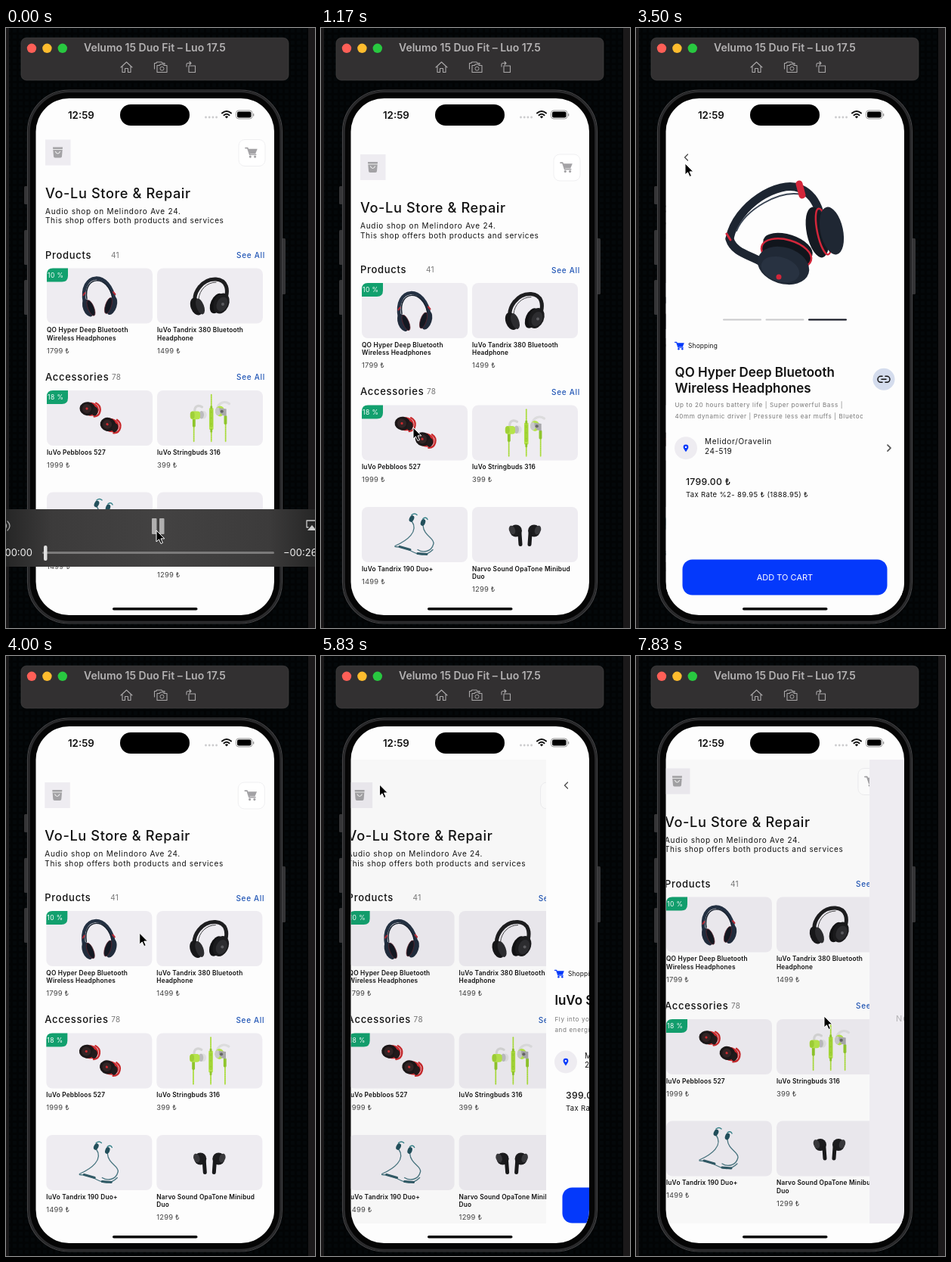
These frames come from a looping animation (409 by 793 pixels, 8 s). An HTML page:

```html
<!DOCTYPE html>
<html lang="en">
<head>
<meta charset="utf-8">
<title>Audio shop app</title>
<style>
  html, body { margin: 0; width: 100%; height: 100%; overflow: hidden; background: #000; }
  svg { display: block; width: 409px; height: 793px; font-family: Inter, "Noto Sans", sans-serif; }
  text { white-space: pre; }
</style>
</head>
<body>
<svg id="stage" viewBox="0 0 409 793"></svg>
<script>
const LOOP = 8000, FPS = 6, SLIDE = 315;
const CARD = '#eeecf1', PAPER = '#fdfdfd', BLUE = '#0439fb';

// Markup helpers
const text = (x, y, size, str, { w = 400, ls = 0, fill = '#111', anchor = 'start' } = {}) =>
  `<text x="${x}" y="${y}" font-size="${size}" font-weight="${w}" letter-spacing="${ls}" fill="${fill}" text-anchor="${anchor}">${str.replace(/&/g, '&amp;')}</text>`;
const rect = (x, y, w, h, r, fill, extra = '') =>
  `<rect x="${x}" y="${y}" width="${w}" height="${h}" rx="${r}" fill="${fill}" ${extra}/>`;
const disc = (x, y, r, fill) => `<circle cx="${x}" cy="${y}" r="${r}" fill="${fill}"/>`;
const oval = (x, y, rx, ry, turn, fill, extra = '') =>
  `<ellipse rx="${rx}" ry="${ry}" transform="translate(${x} ${y}) rotate(${turn})" fill="${fill}" ${extra}/>`;
const line = (d, color, width = 1, extra = '') =>
  `<path d="${d}" fill="none" stroke="${color}" stroke-width="${width}" stroke-linecap="round" stroke-linejoin="round" ${extra}/>`;
const shape = (d, fill) => `<path d="${d}" fill="${fill}"/>`;
const at = (x, y, body, scale = 1) => `<g transform="translate(${x} ${y}) scale(${scale})">${body}</g>`;
const group = (id, body, extra = '') => `<g id="${id}" ${extra}>${body}</g>`;

const cartIcon = (x, y, scale, color) => at(x, y,
  line('M0 1H2.6L5.4 9.3H13', color, 1.6) + shape('M3.4 2.2H15L12.6 8.2H5.4Z', color) +
  disc(6, 12, 1.5, color) + disc(12, 12, 1.5, color), scale);

// Products, each centred on 0,0
const frontHeadphones =
  line('M-20 9C-28-32 14-36 20 8', '#243143', 4.5) + line('M-17 4C-22-27 11-29 17 3', '#16202d', 1.5) +
  line('M-21.5-1L-19.500-4M20.500-2L18-5', '#b92a35', 2) +
  oval(-15.5, 16, 6.5, 12, -22, '#212c3c') + oval(16, 13, 6.5, 12.5, 18, '#212c3c') +
  oval(-11.5, 16, 4, 11, -22, '#131822', 'stroke="#6d2730" stroke-width=".6"') +
  oval(11.5, 13, 4, 11, 18, '#131822', 'stroke="#6d2730" stroke-width=".6"');

const sideHeadphones =
  line('M-34 18C-40-30-22-64 6-64C34-64 44-28 36 22', '#1c2430', 14) +
  line('M-26 8C-26-34-14-57 6-57C24-57 33-34 31-2', '#343e4c', 2) +
  line('M32-13L46-13', '#d3263a', 7, 'stroke-linecap="butt"') +
  oval(19, 36, 20, 30, 24, '#171c25') + oval(24, 33, 12, 20, 24, '#2b313b') +
  oval(3, 43, 10, 26, 14, '#11151c', 'stroke="#c42336" stroke-width="2.5"') +
  oval(-21, 34, 23, 35, -20, '#202936') + oval(-25, 36, 17, 27, -20, '#273140') +
  disc(-35, 44, 2.5, '#d3263a');

const tiltedHeadphones =
  line('M-73 4C-64-40-8-74 20-62C34-56 42-44 46-30', '#1d2531', 11) +
  line('M-73 5C-67 24-45 26-30 36', '#1d2531', 11) +
  line('M-64-6C-52-34-8-60 22-54', '#3a4554', 2) +
  line('M19-68L23-53', '#d3263a', 9, 'stroke-linecap="butt"') + line('M-77-2L-72 6', '#d3263a', 3) +
  oval(43, -4, 14, 34, -12, '#151a22') + oval(51, -5, 8, 31, -12, 'none', 'stroke="#d3263a" stroke-width="2.5"') +
  oval(62, -6, 15, 32, -12, '#1f2733') +
  oval(4, 16, 34, 17, 18, '#171c25') + oval(2, 24, 34, 18, 16, '#11151c', 'stroke="#d3263a" stroke-width="2.5"') +
  oval(-2, 40, 35, 24, 17, '#202936') + oval(-6, 45, 26, 16, 17, '#283241') + disc(-8, 55, 3.5, '#d3263a');

const blackHeadphones =
  line('M-19 12C-24-4-10-23 8-22C22-21 26-8 19 8', '#1e1e20', 5) + line('M-15 4C-14-8-4-18 8-18', '#444446', 1) +
  oval(-18, 14, 7.5, 12, -20, '#171719') + oval(-13, 14, 5, 11, -20, '#2c2c2f') +
  oval(9, 10, 8, 14, 24, '#111113') + oval(15, 10, 10, 14, 24, '#1b1b1d') + oval(16, 11, 7, 10, 24, '#2d2d30') + disc(17, 11, 2, '#5c5c60');

const bud = (x, y, turn) => at(x, y, `<g transform="rotate(${turn})">` +
  line('M8-9C17-6 17 7 8 9', '#c92a2d', 2.4) + oval(2, 0, 11, 9, 0, '#d02b30') +
  oval(-2, 0, 10.5, 9, 0, '#1c1718') + oval(-3, 0, 6, 6, 0, '#332526') + oval(8, 2, 4, 6, 0, '#221b1c') +
  disc(-3, 0, 1.6, '#d02b30') + '</g>');
const redBuds = bud(-14, -12, 8) + bud(13, 9, 15);

const LIME = '#b5e34a', LIME_DARK = '#8fc52c';
const wire = (x, from, to) => line(`M${x} ${from}V${to}`, LIME, 5, 'stroke-linecap="butt"') +
  line(`M${x} ${from}V${to}`, LIME_DARK, 1.5, 'stroke-dasharray="3 5"');
const limeEarphones =
  wire(-61, 28, 88) + wire(5, -88, 88) + wire(59, 10, 88) +
  rect(-3, -38, 16, 82, 3, LIME) + rect(0, -32, 10, 66, 4, '#a4d636', `stroke="${LIME_DARK}"`) +
  [-22, 0, 22].map(y => disc(5, y, 2, LIME_DARK)).join('') +
  rect(1, -46, 8, 12, 2, LIME_DARK) + rect(1, 40, 8, 14, 2, LIME_DARK) +
  line('M-58-28C-58-46-44-50-30-42', '#d4d4d4', 9) +
  oval(-24, -12, 12, 15, 0, '#dededf') + oval(-32, -12, 9, 15, 0, '#bcbcbe') +
  rect(-66, -2, 11, 36, 4, LIME_DARK) + rect(-75, -26, 38, 31, 11, LIME) + oval(-66, -11, 8, 14, 0, '#9fcf38') +
  line('M26-32C32-60 56-66 73-54', '#dcdcdd', 9) +
  rect(53, -10, 11, 34, 4, LIME_DARK) + oval(38, -26, 17, 20, 0, LIME) +
  oval(30, -25, 10, 15, 0, '#c9c9cb') + shape('M36-38L62-34L62-7L48-10C38-18 34-26 36-38Z', '#a9a9ab') + disc(45, -25, 6, '#666');

const neckband =
  line('M-4-18C6-4-10 8-26 15', '#47747f', 1.3) +
  line('M11-12C12 2 26 4 25 12C22 24 10 24 4 20', '#47747f', 1.3) +
  line('M-26 16C-16 16-8 20 0 24S16 28 24 20', '#47747f', 1.3) +
  line('M-20 16L-6 20M4 25L16 26', '#315a66', 3) +
  oval(-4, -21, 3, 4.5, 25, '#23505c') + oval(11, -16, 3, 4.5, 20, '#23505c') +
  line('M-4-26Q0-29 3-26M11-21Q15-24 17-20', '#37838a', 1.5);

const pod = side => oval(side * 12, -5, 8, 8, 0, '#1c1c1e') + oval(side * 17, -6, 4, 6, side * 20, '#39393c') +
  line(`M${side * 7}-1L${side * 6} 13`, '#19191b', 5);
const blackPods = pod(-1) + pod(1);

// Shop page
const card = (x, y, art, scale, names, price, badge) =>
  rect(x, y, 140, 73, 8, CARD) + at(x + 70, y + 36.5, art, scale) +
  (badge ? shape(`M${x} ${y + 8}q0-8 8-8h20v10q0 8-8 8h-20z`, '#12a06e') +
    text(x + 1, y + 12, 8.5, badge, { ls: .45, fill: '#fff' }) : '') +
  names.map((n, i) => text(x, y + 84.5 + i * 10.5, 8.3, n, { w: 600, ls: .2 })).join('') +
  text(x, y + 101.5 + (names.length - 1) * 10.5, 9.4, price, { ls: .2, fill: '#444' });

const section = (y, title, count, countX) =>
  text(52, y, 13, title, { w: 500, ls: .7 }) + text(countX, y - 1, 10, count, { ls: .3, fill: '#777' }) +
  text(343, y - .5, 10, 'See All', { w: 500, ls: .7, fill: '#2055b5', anchor: 'end' });

const shopPage = group('scroll',
  rect(52, 167, 33.5, 34, 0, CARD) +
  shape('M62 177H75L74 189Q74 191 72 191H65Q63 191 63 189Z', '#a3a2a5') + line('M62.5 180H74.5M65.5 183Q68.5 188 71.5 183', '#eee', 1.2) +
  group('cartButton', rect(308, 167, 35, 35, 8, '#fff', 'stroke="#efeff1"') + cartIcon(317, 177, 1.05, '#a3a2a5')) +
  text(52, 244, 18.2, 'Vo-Lu Store & Repair', { w: 500, ls: .6 }) +
  text(52, 265, 10, 'Audio shop on Melindoro Ave 24.', { ls: .75 }) +
  text(52, 277.7, 10, 'This shop offers both products and services', { ls: .65 }) +
  section(324, 'Products', '41', 139) +
  card(54, 337, frontHeadphones, 1, ['QO Hyper Deep Bluetooth', 'Wireless Headphones'], '1799 ₺', '10 %') +
  card(200, 337, blackHeadphones, 1, ['luVo Tandrix 380 Bluetooth', 'Headphone'], '1499 ₺') +
  section(485, 'Accessories', '78', 140) +
  card(54, 498.5, redBuds, 1, ['luVo Pebbloos 527'], '1999 ₺', '18 %') +
  card(200, 498.5, limeEarphones, .35, ['luVo Stringbuds 316'], '399 ₺') +
  card(54, 633, neckband, 1, ['luVo Tandrix 190 Duo+'], '1499 ₺') +
  card(200, 633, blackPods, 1, ['Narvo Sound OpaTone Minibud', 'Duo'], '1299 ₺'));

// Product page
const productPage = ({ id, slides, names, about, price, tax }) => {
  const drop = (names.length - 1) * 18.7, mid = 455 + drop / 2, linkX = 328;
  return group(id,
    rect(40, 137, 315, 613, 0, PAPER) + line('M68.5 167L64.5 171L68.5 175', '#444', 1.2) +
    '<g clip-path="url(#contentClip)">' +
    group(id + 'Slides', slides.map((art, i) => at(197 + i * SLIDE, 274, art[0], art[1])).join('')) + '</g>' +
    [0, 1, 2].map(i => rect(115 + i * 56.5, 384.6, 51, 2, 1, '#c9c9cc') +
      rect(115 + i * 56.5, 384.6, 51, 2, 1, '#10131f', `class="${id}Mark"`)).join('') +
    cartIcon(51.5, 414.5, .82, BLUE) + text(69, 423.3, 8.3, 'Shopping', { ls: .2 }) +
    names.map((n, i) => text(51.5, 461 + i * 20.5, 17, n, { w: 600 })).join('') +
    disc(linkX, mid, 14.5, '#d4dced') +
    line(`M${linkX - 2} ${mid - 4}h-2a4 4 0 0 0 0 8h2M${linkX + 2} ${mid - 4}h2a4 4 0 0 1 0 8h-2M${linkX - 3} ${mid}h6`, '#111', 1.5) +
    `<g clip-path="url(#aboutClip)">` +
    about.map((n, i) => text(51.5, 482.5 + drop + i * 14.7, 8.1, n, { ls: .6, fill: '#777' })).join('') + '</g>' +
    disc(66, 536.5 + drop, 15, CARD) +
    at(66, 536.5 + drop, shape('M0 5C-2 2-3.4 .5-3.4-1.4A3.4 3.4 0 0 1 3.4-1.4C3.4 .5 2 2 0 5Z', BLUE) + disc(0, -1.3, 1.2, '#fff')) +
    text(91, 531.5 + drop, 10, 'Melidor/Oravelin', { ls: .7 }) + text(91, 544 + drop, 10, '24-519', { ls: .5 }) +
    line(`M333 ${532.5 + drop}l4 4l-4 4`, '#555', 1.7) +
    text(66, 585 + drop, 12.2, price, { w: 500, ls: .3 }) + text(66, 601 + drop, 9.5, tax, { ls: .35 }) +
    rect(61.5, 702.5, 271, 47, 13, BLUE) +
    text(197, 730, 11, 'ADD TO CART', { fill: '#fff', anchor: 'middle' }));
};

const products = [
  { id: 'headphones', slides: [[frontHeadphones, 2.7], [sideHeadphones, 1], [tiltedHeadphones, 1]],
    names: ['QO Hyper Deep Bluetooth', 'Wireless Headphones'],
    about: ['Up to 20 hours battery life | Super powerful Bass |', '40mm dynamic driver | Pressure less ear muffs | Bluetooth'],
    price: '1799.00 ₺', tax: 'Tax Rate %2- 89.95 ₺ (1888.95) ₺' },
  { id: 'earphones', slides: [[limeEarphones, 1]],
    names: ['luVo Stringbuds 316'],
    about: ['Fly into your workouts with precise tones that inspire', 'and energize your system with its HD sound, all the time'],
    price: '399.00 ₺', tax: 'Tax Rate %2- 19.95 ₺ (418.95) ₺' },
];

const cartPage = group('cart', rect(40, 137, 315, 613, 0, CARD) +
  text(75, 483, 11, 'No products in your shopping cart yet', { ls: .9, fill: '#b4b3b6' }));

// Simulator window, phone and media bar
const backdrop = rect(0, 0, 409, 793, 0, '#020405') + rect(0, 0, 409, 793, 0, 'url(#dots)') +
  rect(0, 0, 4, 793, 0, '#1b191a') + rect(400, 0, 9, 793, 0, '#1b191a');

const toolbar = rect(20, 13, 354, 56, 7, '#323031', 'stroke="#444243" stroke-width=".7"') +
  ['#ff5f57', '#febc2e', '#28c840'].map((c, i) => disc(34 + i * 20.4, 26.8, 6.2, c)).join('') +
  text(103, 31, 14, 'Velumo 15 Duo Fit – Luo 17.5', { w: 600, fill: '#b4b2b3' }) +
  line('M152 52L159.5 45L167 52M154 51V58.5H157.5V53.5H161.5V58.5H165V51', '#aaa8a9', 1.1) +
  line('M196.5 54V46.5H198.5L200 45H206L207 46.5H210V48M200 49.5H203L204.5 48H208L209.5 49.5H213V58.5H200Z', '#aaa8a9', 1.1) +
  `<circle cx="206.5" cy="53.7" r="2.5" fill="none" stroke="#aaa8a9"/>` +
  line('M242 50H250.5V58.5H242ZM239 51V48Q239 46.5 241 46.5H245M243 44.5L245 46.5L243 48.5', '#aaa8a9', 1.1);

const phone = [[24, 209, 24], [24, 267, 46], [24, 333, 46], [365, 278, 74]]
    .map(([x, y, h]) => rect(x, y, 5, h, 1.5, '#343436')).join('') +
  rect(28.5, 82, 337, 705, 55, '#050505', 'stroke="#454547" stroke-width="1.2"') +
  rect(30.5, 84, 333, 701, 53, 'none', 'stroke="#2a2a2c" stroke-width="2.6"') +
  rect(39.5, 93, 315.5, 683, 44, PAPER);

const statusBar = text(82, 120, 13.3, '12:59', { w: 600 }) + rect(151, 101, 92, 28, 14, '#000') +
  [0, 1, 2, 3].map(i => disc(264.5 + i * 4.7, 118, 1.4, '#cbcbcd')).join('') +
  line('M286 112.5Q292 107.5 298 112.5M288.5 115.3Q292 112.3 295.5 115.3', '#111', 2) + shape('M289.8 117.2Q292 115.5 294.2 117.2L292 119.5Z', '#111') +
  rect(304.5, 109, 21.5, 11, 3.5, 'none', 'stroke="#999"') + rect(306, 110.5, 18.5, 8, 2, '#000') + rect(327, 113, 1.3, 3.5, .6, '#999');

const mediaBar = group('mediaBar', rect(0, 636, 409, 76, 0, 'url(#barTone)') +
  rect(193, 648, 6.5, 21, 1, '#b0afaf') + rect(203, 648, 6.5, 21, 1, '#b0afaf') +
  line('M-1 654Q2 658 -1 662M2 652Q8 658 2 664', '#aaa', 1.2) +
  line('M400 660H398V651H410', '#ccc', 1.3) + shape('M405 657L411 664H399Z', '#ccc') +
  rect(48, 692, 307, 3, 1.5, '#7b7a7a') + rect(50, 684, 4.5, 20, 2, '#dedede') +
  text(35, 698, 13, '00:00', { fill: '#eee', anchor: 'end' }) + text(367, 698, 13, '−00:26', { fill: '#eee' }));

const pointer = group('pointer', `<path d="M0 0V15L3.5 11.8L6 17.5L8.5 16.4L6 10.9H10.8Z" fill="#000" stroke="#fff"/>`);

document.getElementById('stage').innerHTML = `<defs>
  <pattern id="dots" width="8" height="8" patternUnits="userSpaceOnUse">${rect(1, 1, 5, 5, 1, '#04080a')}</pattern>
  <linearGradient id="barTone"><stop offset="0" stop-color="#262626"/><stop offset=".15" stop-color="#3c3b3b"/>
    <stop offset=".5" stop-color="#434242"/><stop offset=".85" stop-color="#3c3b3b"/><stop offset="1" stop-color="#262626"/></linearGradient>
  <clipPath id="screenClip">${rect(39.5, 93, 315.5, 683, 44, '#000')}</clipPath>
  <clipPath id="contentClip" clip-path="url(#screenClip)">${rect(39.5, 137, 315.5, 613, 0, '#000')}</clipPath>
  <clipPath id="aboutClip">${rect(40, 440, 260, 120, 0, '#000')}</clipPath></defs>` +
  backdrop + toolbar + phone +
  `<g clip-path="url(#contentClip)">` + group('shop', shopPage) + rect(39, 137, 316, 613, 0, '#000', 'id="shade"') +
  products.map(productPage).join('') + cartPage + '</g>' +
  statusBar + rect(141, 766, 112.5, 3.6, 1.8, '#000') + mediaBar + pointer;

// Motion: keys are [time, ...values]
const easeOut = p => 1 - (1 - p) ** 3;
const smooth = p => p * p * (3 - 2 * p);
function track(t, keys, ease = easeOut) {
  const i = keys.findIndex(k => k[0] > t);
  if (i === 0) return keys[0].slice(1);
  if (i < 0) return keys.at(-1).slice(1);
  const a = keys[i - 1], b = keys[i], p = ease((t - a[0]) / (b[0] - a[0]));
  return a.slice(1).map((v, k) => v + (b[k + 1] - v) * p);
}

const scrollKeys = [[170, -19.5], [1050, 0], [6000, 0], [6400, -18.5]];
const barKeys = [[170, 1], [600, 0]];
const detailKeys = [[1500, 0], [1980, 1], [3667, 1], [4080, 0], [4330, 0], [4750, 1], [5667, 1], [6050, 0]];
const slideKeys = [[2000, 0], [2410, 1], [2800, 1], [3210, 2]];
const cartKeys = [[6720, 0], [7150, 1], [7600, 1], [8093, 0]];
const pointerKeys = [[0, 199, 664], [170, 199, 664], [1167, 122, 528], [1400, 122, 370], [1550, 122, 370],
  [1900, 270, 303], [2167, 207, 303], [2400, 130, 300], [2750, 270, 300], [3000, 130, 300], [3500, 65, 179],
  [3667, 65, 171], [3800, 65, 171], [4167, 262, 515], [4400, 262, 515], [4833, 204, 295], [5100, 204, 295],
  [5500, 66, 171], [5750, 66, 171], [6400, 322, 149], [6850, 322, 149], [7400, 60, 470], [7580, 60, 470], [7833, 249, 476]];

const $ = id => document.getElementById(id);
const move = (id, x, y = 0) => $(id).setAttribute('transform', `translate(${x} ${y})`);

function render(time) {
  const t = Math.floor((time + 4) * FPS / 1000) * 1000 / FPS;
  const [detail] = track(t, detailKeys), [cart] = track(t, cartKeys), [slide] = track(t, slideKeys);
  const cover = Math.max(detail, cart), shown = t < 4200 ? 0 : 1;
  move('scroll', 0, track(t, scrollKeys)[0]);
  move('shop', -96 * cover);
  $('shade').setAttribute('opacity', .14 * cover);
  products.forEach(({ id }, i) => {
    const current = i === 0 ? slide : 0;
    $(id).style.display = i === shown && detail > 0 ? '' : 'none';
    move(id, SLIDE * (1 - detail));
    move(id + 'Slides', -SLIDE * current);
    document.querySelectorAll(`.${id}Mark`).forEach((mark, k) =>
      mark.setAttribute('opacity', Math.max(0, 1 - Math.abs(k - current))));
  });
  move('cart', SLIDE * (1 - cart));
  $('cartButton').setAttribute('opacity', t > 6600 && t < 6900 ? .15 : 1);
  $('mediaBar').setAttribute('opacity', track(t, barKeys)[0]);
  move('pointer', ...track(t, pointerKeys, smooth));
}

const start = performance.now();
function tick() {
  render((performance.now() - start) % LOOP);
  requestAnimationFrame(tick);
}
tick();
</script>
</body>
</html>
```
